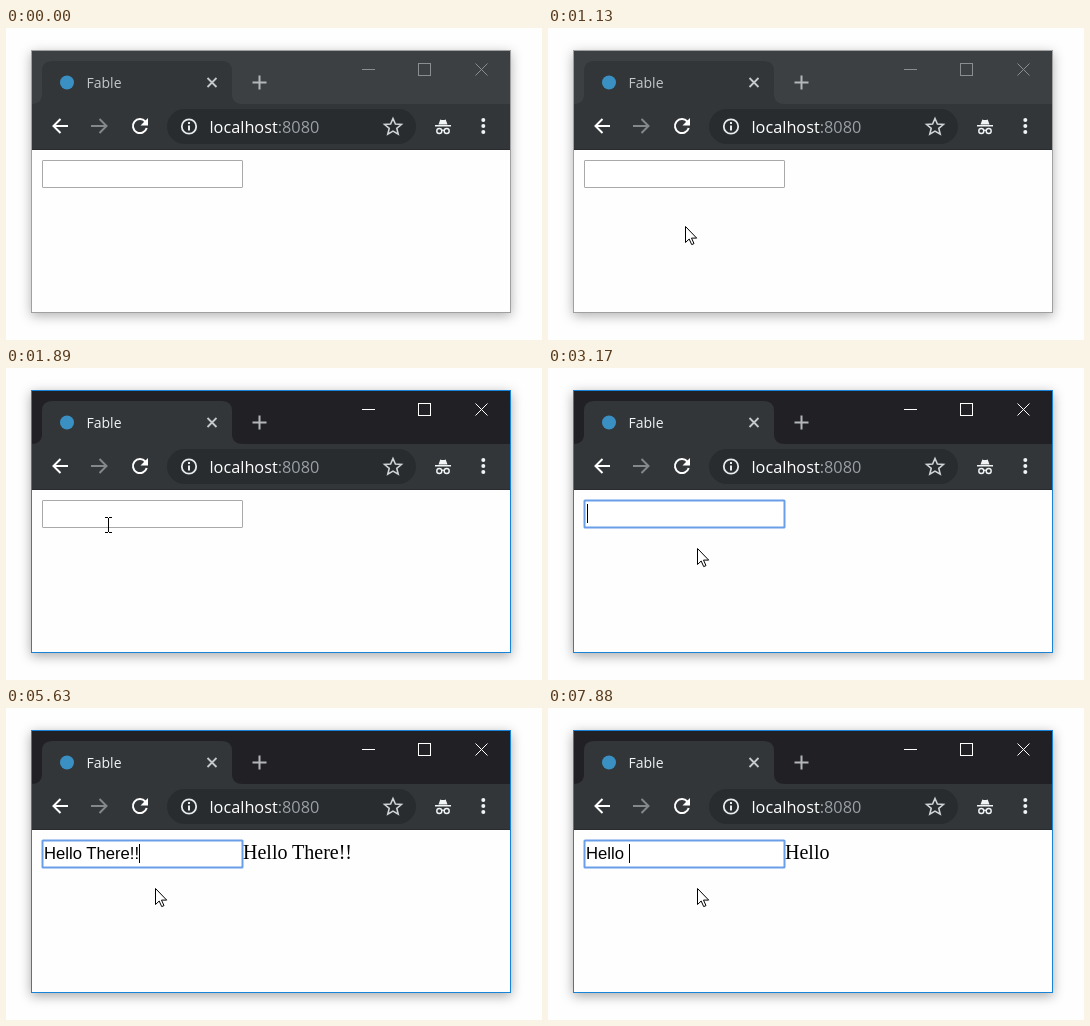
Recreate the animation shown at these times as an HTML page. Size 536 px wide and 312 px high, loop 8 s.

```html
<!DOCTYPE html>
<html lang="en">
<head>
<meta charset="utf-8">
<title>Live input</title>
<style>
  html, body { margin: 0; width: 100%; height: 100%; overflow: hidden; background: #fefefe; }
  svg { display: block; width: 536px; height: 312px; }
  #stage { --frame: #3c4043; --edge: #a0a0a0; --title: #c4c7ca; --controls: #8b8d8f; --shade: .3; }
  #stage.active { --frame: #202025; --edge: #1883d7; --title: #f1f3f4; --controls: #fff; --shade: .34; }
  .shadow { filter: drop-shadow(0 3px 6px rgba(0, 0, 0, var(--shade))); }
  .edge { fill: none; stroke: var(--edge); }
  .controls { fill: none; stroke: var(--controls); }
  .ui { font-family: "Open Sans", "Noto Sans", sans-serif; }
  .typed { font: 16.667px "Liberation Sans", Arial, sans-serif; }
  .echo { font: 20px "Liberation Serif", "Times New Roman", serif; }
  .field { fill: #fff; stroke: #a9a9a9; }
  .active .field.focus { stroke: #6a9ee9; stroke-width: 2; }
</style>
</head>
<body>
<svg id="stage" viewBox="0 0 536 312">
  <rect class="shadow" x="25" y="22" width="480" height="263" fill="#fefefe"/>

  <!-- browser frame -->
  <rect x="25" y="22" width="480" height="55" fill="var(--frame)"/>
  <path d="M25 76Q36 76 36 66V43Q36 33 46 33H216Q226 33 226 43V66Q226 76 237 76H505V122H25Z" fill="#323639"/>
  <path d="M25 121.5H505" stroke="#292b2e"/>
  <circle cx="61" cy="54.5" r="7" fill="#3a90c2"/>
  <text class="ui" x="80.5" y="60" font-size="14" fill="var(--title)">Fable</text>
  <path d="M201.5 50l9 9m0-9l-9 9" stroke="#c6c9cc" stroke-width="1.8"/>
  <path d="M246.500 54.500h14m-7-7v14" stroke="#b4b7ba" stroke-width="2"/>
  <g class="controls">
    <path d="M356 41.500h13"/>
    <rect x="412.500" y="35.500" width="12" height="12"/>
    <path d="M469.500 35.500l12 12m0-12l-12 12"/>
  </g>

  <!-- toolbar -->
  <rect x="161" y="81" width="249" height="35" rx="17.5" fill="#282c2f"/>
  <g fill="none" stroke-width="2">
    <path id="back" d="M62 98H47.500m7-7l-7 7 7 7" stroke="#fff"/>
    <path d="M85 98h15.500m-7-7l7 7-7 7" stroke="#85888b"/>
    <path d="M139.300 93.500A7 7 0 1 0 140.700 100" stroke="#fff"/>
    <circle cx="183" cy="98.500" r="7.200" stroke="#e8eaed" stroke-width="1.800"/>
    <path d="M183 97.500v5m0-8.500v1.900" stroke="#e8eaed"/>
    <path d="M387 90.500l2.400 5.500 6 .5-4.600 3.900 1.400 5.800-5.200-3.100-5.200 3.100 1.400-5.800-4.600-3.900 6-.5z" stroke="#d0d3d6" stroke-width="1.600"/>
  </g>
  <path d="M142 90v7.500h-7.500z" fill="#fff"/>
  <g class="ui" font-size="16.3">
    <text x="203.500" y="105" fill="#fff">localhost<tspan fill="#9aa0a6">:8080</tspan></text>
  </g>
  <g fill="#f1f3f4">
    <path d="M432.500 96.500l1.800-5q2.700 1 5.400 0l1.800 5zM429 97h16v1.500h-16z"/>
    <g fill="none" stroke="#f1f3f4" stroke-width="1.400">
      <circle cx="433.300" cy="103" r="2.500"/>
      <circle cx="440.700" cy="103" r="2.500"/>
      <path d="M435.800 102.500q1.200-.8 2.400 0"/>
    </g>
    <circle cx="477.300" cy="92" r="2"/>
    <circle cx="477.300" cy="98" r="2"/>
    <circle cx="477.300" cy="104" r="2"/>
  </g>
  <rect class="edge" x="25.500" y="22.500" width="479" height="262"/>

  <!-- page -->
  <rect id="field" class="field" x="36.500" y="132.500" width="200" height="27" rx=".5"/>
  <text id="typed" class="typed" x="38" y="151"></text>
  <text id="echo" class="echo" x="237" y="151"></text>
  <rect id="caret" y="136" width="1" height="19"/>

  <g id="pointer">
    <path id="arrow" d="M.5.5V16.500L4.200 13l2.500 5.600 2.300-1-2.500-5.500H11.700Z" fill="#fff" stroke="#000"/>
    <path id="beam" d="M-3 -7.500H0M1 -7.500H4M.5 -7V7M-3 7.500H0M1 7.500H4" fill="none" stroke="#000"/>
  </g>
</svg>
<script>
  const LOOP = 8000;
  const PHRASE = "Hello There!!";
  const ACTIVATE = 1890, FOCUS = 1990;
  const typeTimes = [3230, 3400, 3540, 3680, 3900, 4160, 4520, 4760, 4870, 5010, 5170, 5490, 5630];
  const eraseTimes = [6760, 6870, 7050, 7410, 7600, 7790, 7880];
  const caretToggles = [FOCUS, 2650, 3170, 6150, 6650, 7180, 7700];

  const easeOut = u => u * (2 - u);
  const easeInOut = u => u * u * (3 - 2 * u);

  // Each move advances in even steps; the first step lands at its start time.
  const moves = [
    { start: 150, end: 930, steps: 13, from: [393, 291], to: [165, 212], ease: easeOut, lead: 0 },
    { start: 1030, end: 1130, steps: 2, from: [165, 212], to: [137, 198], ease: u => u, lead: 1 },
    { start: 1160, end: 1810, steps: 11, from: [137, 198], to: [102, 157], ease: easeOut, lead: 1 },
    { start: 2050, end: 2390, steps: 6, from: [102, 157], to: [149, 180], ease: easeInOut, lead: 1 }
  ];

  const el = id => document.getElementById(id);
  const [stage, field, typed, echo, caret, pointer, arrow, beam] =
    ["stage", "field", "typed", "echo", "caret", "pointer", "arrow", "beam"].map(el);
  const passed = (times, t) => times.filter(time => time <= t).length;
  const show = (node, on) => node.setAttribute("visibility", on ? "visible" : "hidden");

  function pointerAt(t) {
    const move = moves.filter(m => m.start <= t).pop();
    if (!move) return null;
    const { start, end, steps, from, to, ease, lead } = move;
    const step = Math.min(steps - 1, Math.floor((t - start) / (end - start) * (steps - 1) + 1e-6));
    const u = ease((step + lead) / (steps - 1 + lead));
    return from.map((v, i) => Math.round(v + (to[i] - v) * u));
  }

  function drawField(t) {
    const focused = t >= FOCUS;
    const text = PHRASE.slice(0, passed(typeTimes, t) - passed(eraseTimes, t));
    stage.classList.toggle("active", t >= ACTIVATE);
    field.classList.toggle("focus", focused);
    if (typed.textContent !== text) typed.textContent = echo.textContent = text;

    const ctx = drawField.ctx ||= document.createElement("canvas").getContext("2d");
    ctx.font = '16.667px "Liberation Sans", Arial, sans-serif';
    caret.setAttribute("x", Math.max(39, Math.round(38 + ctx.measureText(text).width)));
    show(caret, passed(caretToggles, t) % 2 === 1);
  }

  function drawPointer(t) {
    const spot = pointerAt(t);
    const overField = spot && spot[1] <= 160;
    show(arrow, spot && !overField);
    show(beam, overField);
    if (spot) pointer.setAttribute("transform", `translate(${spot})`);
  }

  function frame() {
    const t = performance.now() % LOOP;
    drawField(t);
    drawPointer(t);
    requestAnimationFrame(frame);
  }
  frame();
</script>
</body>
</html>
```
